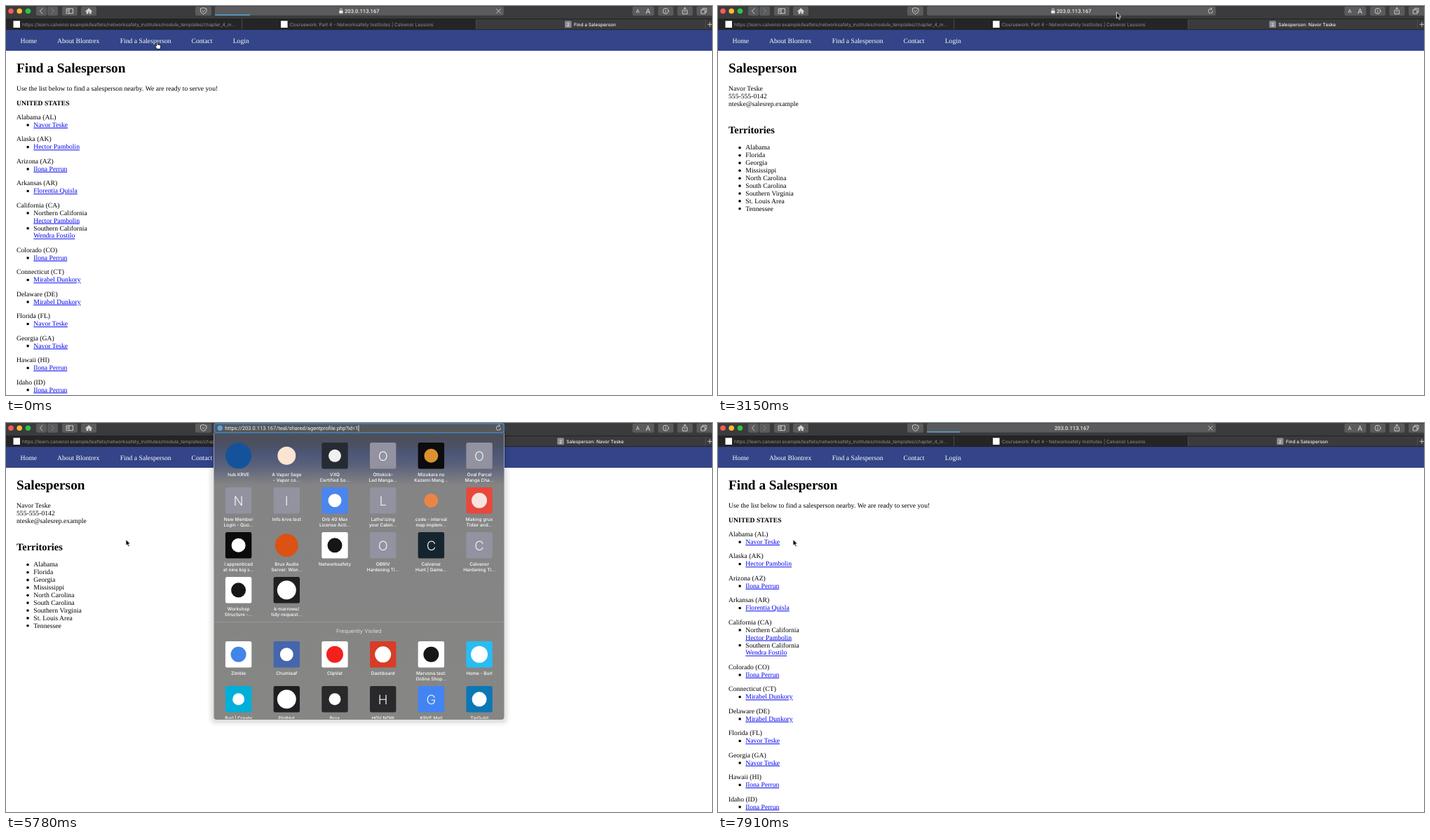
Animation of 1007 by 556 pixels, one loop 8000 ms. Source, as an HTML page:

```html
<!DOCTYPE html>
<html lang="en">
<head>
<meta charset="utf-8">
<title>Salesperson directory</title>
<style>
html, body { margin: 0; width: 100%; height: 100%; overflow: hidden; background: #fff; }
svg { display: block; width: 100%; height: 100%; text-rendering: geometricPrecision; }
.page { font: 9.67px "Liberation Serif", "Times New Roman", serif; }
.page .h1 { font-size: 19.3px; font-weight: 700; }
.page .h2 { font-size: 14.4px; font-weight: 700; }
.page .b { font-weight: 700; }
.page .link { fill: #00e; text-decoration: underline; }
.nav { fill: #fff; }
.tab { font: 6.6px Inter, Roboto, sans-serif; fill: #929294; }
.tab.on { font-weight: 500; fill: #f2f2f2; }
.url { font: 7.55px Roboto, Inter, sans-serif; fill: #f4f4f4; }
.addr { font: 500 7.6px Roboto, Inter, sans-serif; fill: #ececec; }
.label { font: 500 6.5px Inter, Roboto, sans-serif; fill: #fff; text-anchor: middle; }
.mono { font: 300 18.5px Inter, Roboto, sans-serif; fill: #f1f1f4; text-anchor: middle; }
.head { font: 7.6px Inter, Roboto, sans-serif; fill: #dededc; text-anchor: middle; }
.icon { fill: none; stroke: #d6d6d6; stroke-width: .9; stroke-linecap: round; stroke-linejoin: round; }
.button { fill: #5a5b5c; }

/* Every change is a hard cut, so all tracks hold their value until the next key. */
.t { animation: 8s step-end infinite; }
#list { animation-name: list; }
#seller { animation-name: seller; }
#listTab { animation-name: listTab; }
#sellerTab { animation-name: sellerTab; }
#stop { animation-name: stop; }
#reload { animation-name: reload; }
#bar { animation-name: bar; }
#share { animation-name: share; }
#lock { animation-name: lock; }
#idle { animation-name: idle; }
#ghost { animation-name: ghost; }
#focus { animation-name: focus; }
#typed { animation-name: typed; }
#select { animation-name: select; }
#caret { animation-name: caret; }
#panel { animation-name: panel; transform-origin: 503.5px 0; }
#cursor { animation-name: move; }
#arrow { animation-name: arrow; }
#hand { animation-name: hand; }
#beam { animation-name: beam; }

@keyframes list { 0% { opacity: 1 } 26% { opacity: 0 } 98.875%, 100% { opacity: 1 } }
@keyframes seller { 0% { opacity: 0 } 26% { opacity: 1 } 98.875%, 100% { opacity: 0 } }
@keyframes listTab { 0% { opacity: 1 } 29.75% { opacity: 0 } 98.875%, 100% { opacity: 1 } }
@keyframes sellerTab { 0% { opacity: 0 } 29.75% { opacity: 1 } 98.875%, 100% { opacity: 0 } }
@keyframes stop { 0%, 26%, 94.125%, 100% { opacity: 1 } 6.75%, 29.75% { opacity: 0 } }
@keyframes reload { 0%, 26%, 94.125%, 100% { opacity: 0 } 6.75%, 29.75% { opacity: 1 } }
@keyframes bar {
  0% { width: 50px } 3.375% { width: 87px } 6.75% { width: 0 }
  26% { width: 60px } 29.75% { width: 0 }
  94.125% { width: 14px } 98.875%, 100% { width: 47px }
}
@keyframes share { 0% { opacity: 1 } 26% { opacity: .35 } 29.75%, 100% { opacity: 1 } }
@keyframes lock { 0% { opacity: 1 } 94.125%, 100% { opacity: 0 } }
@keyframes idle {
  0% { opacity: 1; transform: none }
  44.625% { opacity: 0; transform: none }
  76.25% { opacity: 1; transform: translateX(-27px) }
  79.25% { opacity: 1; transform: translateX(-10px) }
  84.125% { opacity: 1; transform: none }
  94.125%, 100% { opacity: 1; transform: translateX(-3px) }
}
@keyframes ghost { 0%, 79.25%, 100% { opacity: 0 } 76.25% { opacity: 1 } }
@keyframes focus { 0%, 76.25%, 100% { opacity: 0 } 44.625% { opacity: 1 } }
@keyframes typed { 0% { transform: translateX(28px) } 48.75%, 100% { transform: none } }
@keyframes select { 0% { opacity: 1 } 53.625%, 100% { opacity: 0 } }
@keyframes caret { 0%, 59.875%, 100% { opacity: 0 } 53.625%, 69.25% { opacity: 1 } }
@keyframes panel {
  0%, 76.25%, 100% { opacity: 0; transform: none }
  44.625% { opacity: .64; transform: scale(.9915, .9925) }
  48.75% { opacity: 1; transform: none }
}
@keyframes move {
  0% { transform: translate(212px, 51px) }
  3.375% { transform: translate(178px, 213px) }
  6.75% { transform: translate(211px, 139px) }
  10.125% { transform: translate(146px, 175px) }
  13% { transform: translate(85px, 200px) }
  16% { transform: translate(65px, 173px) }
  18.5%, 21.125% { transform: translate(61px, 170px) }
  26% { transform: translate(322px, 130px) }
  29.75% { transform: translate(528px, 55px) }
  35.5% { transform: translate(572px, 19px) }
  39.375% { transform: translate(568px, 8.5px) }
  48.75% { transform: translate(549px, 4px) }
  69.25% { transform: translate(248px, 126px) }
  72.25% { transform: translate(170.5px, 166px) }
  76.25% { transform: translate(168px, 166px) }
  79.25% { transform: translate(171px, 93px) }
  84.125% { transform: translate(194px, 60px) }
  89.25% { transform: translate(219px, 49px) }
  94.125% { transform: translate(150px, 113px) }
  98.875%, 100% { transform: translate(106.5px, 166px) }
}
@keyframes arrow {
  0%, 13%, 21.125%, 48.75%, 84.125% { opacity: 0 }
  3.375%, 16%, 26%, 69.25%, 94.125%, 100% { opacity: 1 }
}
@keyframes hand {
  0%, 13%, 21.125%, 84.125% { opacity: 1 }
  3.375%, 16%, 26%, 94.125%, 100% { opacity: 0 }
}
@keyframes beam { 0%, 69.25%, 100% { opacity: 0 } 48.75% { opacity: 1 } }
</style>
</head>
<body>
<svg viewBox="0 0 1007 556" preserveAspectRatio="none">
  <defs>
    <linearGradient id="glass" gradientUnits="userSpaceOnUse" x1="0" y1="14" x2="0" y2="427">
      <stop offset="0" stop-color="#4d4f57"/>
      <stop offset=".04" stop-color="#4b5062"/>
      <stop offset=".07" stop-color="#4d5674"/>
      <stop offset=".11" stop-color="#58607a"/>
      <stop offset=".18" stop-color="#848485"/>
      <stop offset="1" stop-color="#868684"/>
    </linearGradient>
    <filter id="blur" x="-5%" y="-5%" width="110%" height="110%"><feGaussianBlur stdDeviation="3"/></filter>
    <clipPath id="inside"><path d="M296 14H711V423H296Z"/></clipPath>
  </defs>

  <!-- page -->
  <path fill="#fff" d="M0 0H1007V556H0Z"/>
  <path fill="#334488" d="M0 33H1007V64H0Z"/>
  <g class="page">
    <g class="nav">
      <text x="20.5" y="52.6">Home</text>
      <text x="73" y="52.6">About Blontrex</text>
      <text x="162.7" y="52.6">Find a Salesperson</text>
      <text x="264.5" y="52.6">Contact</text>
      <text x="323.7" y="52.6">Login</text>
    </g>
    <g id="list" class="t">
      <text class="h1" x="15" y="94.5">Find a Salesperson</text>
      <text x="15" y="121">Use the list below to find a salesperson nearby. We are ready to serve you!</text>
      <text class="b" x="15" y="141.5">UNITED STATES</text>
    </g>
    <g id="seller" class="t">
      <text class="h1" x="15" y="94.5">Salesperson</text>
      <text x="15" y="121">Navor Teske</text>
      <text x="15" y="131.9">555-555-0142</text>
      <text x="15" y="142.8">nteske@salesrep.example</text>
      <text class="h2" x="15" y="181.5">Territories</text>
    </g>
  </g>

  <!-- toolbar -->
  <path fill="#3b3b3d" d="M0 0H1007V34H0Z"/>
  <path fill="#252526" d="M0 18.5H670V33.5H0Z"/>
  <path stroke="#4b4b4d" d="M336.5 18.5V33.5M670.5 18.5V33.5M997.5 18.5V33.5"/>
  <path stroke="#1d1d1e" stroke-width=".8" d="M0 18.5H1007M0 33.6H1007"/>
  <circle cx="7" cy="7.2" r="3.8" fill="#fc5b57"/>
  <circle cx="19.2" cy="7.2" r="3.8" fill="#fdbc2e"/>
  <circle cx="31.5" cy="7.2" r="3.8" fill="#2ac840"/>
  <g id="buttons" class="button"></g>
  <g class="icon">
    <path d="M52 3.5 48.5 7.2 52 11"/>
    <path stroke="#858587" d="M64.8 3.5 68.3 7.2 64.8 11"/>
    <path d="M86.5 3.8H95.5V10.7H86.5ZM90 3.8V10.7M87.7 5.8H88.8M87.7 7.5H88.8"/>
    <path fill="#d6d6d6" stroke-width=".5" d="M113.6 7.4 118.2 3.2 122.8 7.4H121.5V11H119.2V8.2H117.2V11H114.9V7.4Z"/>
    <path d="M281.7 2.6 286 4V7.2Q285.6 10 281.7 11.6 277.8 10 277.4 7.2V4ZM280 6.4 281.7 8 283.4 6.4"/>
    <circle cx="941" cy="7.2" r="4"/>
    <path d="M941 6.8V9.3M941 5V5.1"/>
    <g id="share" class="t"><path d="M966.3 6H965V11.3H971.6V6H970.3M968.3 8.5V2.3M966.5 4 968.3 2.3 970.1 4"/></g>
    <path d="M991.8 5.3H997V11H991.8ZM993.7 5.3V3.3H999V9H997"/>
  </g>
  <g fill="#dedede" font-family="Inter, Roboto, sans-serif">
    <text x="898.6" y="10" font-size="7.5">A</text>
    <text x="912.2" y="10.6" font-size="10">A</text>
  </g>

  <!-- tabs -->
  <path fill="#fff" d="M10.5 21.3H20V31H10.5ZM392 21.3H401.6V31H392Z"/>
  <text class="tab" x="23" y="28.5">https://learn.calvenor.example/leaflets/networksafety_institutes/module_templates/chapter_4_in...</text>
  <text class="tab" x="405" y="28.5">Coursework: Part 4 - Networksafety Institutes | Calvenor Lessons</text>
  <g id="listTab" class="t">
    <rect x="797" y="21.3" width="9.6" height="9.6" rx="1.5" fill="#8b8b95"/>
    <text class="tab on" x="799.8" y="28.5">2</text>
    <text class="tab on" x="810" y="28.5">Find a Salesperson</text>
  </g>
  <g id="sellerTab" class="t">
    <rect x="786.3" y="21.3" width="9.6" height="9.6" rx="1.5" fill="#8b8b95"/>
    <text class="tab on" x="789.1" y="28.5">2</text>
    <text class="tab on" x="799.2" y="28.5">Salesperson: Navor Teske</text>
  </g>
  <path class="icon" d="M1001 26.3H1007M1004 23.3V29.3"/>

  <!-- suggestion panel -->
  <g id="panel" class="t">
    <rect x="292" y="14" width="423" height="415" rx="6" fill="#000" opacity=".13" filter="url(#blur)"/>
    <path fill="#e2e2e2" d="M296 14H711V422Q711 428 705 428H302Q296 428 296 422Z"/>
    <path fill="url(#glass)" d="M296.5 14H710.5V420Q710.5 424 706.5 424H300.5Q296.5 424 296.5 420Z"/>
    <path stroke="#9d9d9b" stroke-width=".8" d="M297 284.5H710.5"/>
    <text class="head" x="503.3" y="300.2">Frequently Visited</text>
    <g id="tiles" clip-path="url(#inside)"></g>
  </g>

  <!-- address field -->
  <rect x="298" y=".5" width="412" height="13" rx="2.5" class="button"/>
  <rect id="bar" class="t" x="298" y="12" width="0" height="1.5" fill="#55a9dc"/>
  <g id="idle" class="t">
    <g id="lock" class="t">
      <rect x="475.3" y="6.4" width="5.2" height="4.2" rx=".6" fill="#ececec"/>
      <path class="icon" d="M476.4 6.4V5.1A1.5 1.5 0 0 1 479.4 5.1V6.4"/>
    </g>
    <text class="addr" x="483" y="10.3">203.0.113.167</text>
  </g>
  <g id="ghost" class="t" opacity="0">
    <g class="url" style="fill:#858688">
      <text x="431" y="10.3">https</text>
      <text x="505.5" y="10.3">/teal/shared/agentprofile.php?id=1</text>
    </g>
  </g>
  <g id="focus" class="t">
    <rect x="297.2" y=".8" width="413" height="13" rx="3" fill="#56585b" stroke="#437fb5" stroke-width="1.8"/>
    <circle cx="305.3" cy="7.2" r="3.7" fill="#58a4df"/>
    <g id="typed" class="t">
      <path id="select" class="t" fill="#3d6b98" d="M312 2.5H503.5V12.5H312Z"/>
      <text class="url" x="312.3" y="10.2">https://203.0.113.167/teal/shared/agentprofile.php?id=1</text>
    </g>
    <path id="caret" class="t" fill="#fff" d="M502.6 3H503.4V12H502.6Z"/>
  </g>
  <path id="stop" class="icon t" d="M699.5 4.3 705.5 10.3M705.5 4.3 699.5 10.3"/>
  <path id="reload" class="icon t" d="M705.7 7.2A3.2 3.2 0 1 1 702.5 4H704M702.8 2.3 704.6 4 702.8 5.8"/>

  <!-- pointer -->
  <g id="cursor" class="t" stroke-linejoin="round">
    <path id="arrow" class="t" fill="#000" stroke="#fff" stroke-width=".8" d="M.5 .4V9.2L2.5 7.4 4 10.7 5.6 10 4.2 6.8H6.9Z"/>
    <path id="hand" class="t" fill="#fff" stroke="#000" stroke-width=".8" d="M2.6 6.3V1.4Q3.4 0 4.2 1.4V4.3Q5 3.7 5.7 4.5 6.5 4 7.2 4.8 8.4 4.4 8.7 5.6V8L7.8 10.5H3.6L.8 7Q.6 5.6 1.6 5.7Z"/>
    <path id="beam" class="t" fill="none" stroke="#e8e8e8" stroke-width=".9" d="M.6 .6Q2.5 .6 2.5 2V8Q2.5 9.6 .6 9.6M4.4 .6Q2.5 .6 2.5 2V8Q2.5 9.6 4.4 9.6M1.4 6.5H3.6"/>
  </g>
</svg>
<script>
const add = (id, markup) => { document.getElementById(id).innerHTML += markup; };
const text = (x, y, s, cls = '') => `<text class="${cls}" x="${x}" y="${y}">${s}</text>`;

add('buttons', [[43, 15], [59, 15], [80, 22], [107, 22], [270, 23], [893.5, 31], [930, 22], [957.5, 22], [985, 24]]
  .map(([x, w]) => `<rect x="${x}" y=".7" width="${w}" height="13" rx="2.2"/>`).join(''));

// Directory: each state has links; "Area: Name" entries take two lines.
const LINE = 10.9, GAP = 9.65;
const [navor, hector, ilona, mirabel] = ['Navor Teske', 'Hector Pambolin', 'Ilona Perrun', 'Mirabel Dunkory'];
const states = [
  ['Alabama (AL)', navor], ['Alaska (AK)', hector], ['Arizona (AZ)', ilona],
  ['Arkansas (AR)', 'Florentia Quisla'],
  ['California (CA)', 'Northern California:' + hector, 'Southern California:Wendra Fostilo'],
  ['Colorado (CO)', ilona], ['Connecticut (CT)', mirabel], ['Delaware (DE)', mirabel],
  ['Florida (FL)', navor], ['Georgia (GA)', navor], ['Hawaii (HI)', ilona], ['Idaho (ID)', ilona]
];
let y = 162, rows = '';
for (const [state, ...people] of states) {
  rows += text(15, y, state);
  for (const entry of people) {
    const parts = entry.split(':');
    rows += `<rect x="29.6" y="${y + LINE - 4.3}" width="3.1" height="3.1"/>`;
    parts.forEach((s, i) => {
      y += LINE;
      rows += text(39.3, y, s, i === parts.length - 1 ? 'link' : '');
    });
  }
  y += LINE + GAP;
}
add('list', rows);

const areas = ['Alabama', 'Florida', 'Georgia', 'Mississippi', 'North Carolina', 'South Carolina',
  'Southern Virginia', 'St. Louis Area', 'Tennessee'];
add('seller', areas.map((s, i) => {
  const base = 205.4 + i * LINE;
  return `<circle cx="31" cy="${base - 2.8}" r="1.8"/>` + text(39.3, base, s);
}).join(''));

// Tiles: label, tile colour, then a letter or a plain dot (colour, radius).
const GREY = '#9292a0', DARK = '#29292c', WHITE = '#fff';
const saved = [
  ['hub.KRVE', '', '#14539a', 18.5], ['A Vapor Sage|- Vapor co...', '', '#fbe4d2', 13],
  ['VXQ|Certified So...', '#262b33', '#f0f0f0', 9], ['Ottokick-|Lad Manga...', GREY, 'O'],
  ['Mizukara no|Kazemi Mang...', '#0c0b0d', '#d9922f', 10], ['Oval Parcel|Manga Cha...', GREY, 'O'],
  ['New Member|Login - Quo...', GREY, 'N'], ['Info.krve.test', GREY, 'I'],
  ['Orb 40 Max|License Acti...', '#4a86ee', WHITE, 9.5], ["Lathe'izing|your Cabin...", GREY, 'L'],
  ['code - interval|map implem...', '', '#e98645', 10], ['Making grux|Tidier and...', '#e8483b', '#f8e4df', 11],
  ['I apprenticed|at nine big s...', '#0b0b0b', WHITE, 10], ['Brux Audio|Server: Won...', '', '#db5212', 16.5],
  ['Networksafety', WHITE, '#161616', 10.5], ['OBRIV|Hardening Ti...', GREY, 'O'],
  ['Calvenor|Hunt | Game...'.replace(' | ', ' &#124; '), '#15252e', 'C'], ['Calvenor|Hardening Ti...', GREY, 'C'],
  ['Workshop|Structure -...', WHITE, '#161616', 10.5], ['k-marrowe/|tidy-request...', '#1f1f22', WHITE, 13.5]
];
const visited = [
  ['Zimble', WHITE, '#4285e8', 11], ['Chumleaf', '#4566ad', WHITE, 9.5], ['ClipVat', WHITE, '#f3211d', 12],
  ['Dashboard', '#d73d28', WHITE, 11.5], ['Marvona.test:|Online Shop...', WHITE, '#161616', 11],
  ['Home - Burl', '#27bdf3', WHITE, 12], ['Burl &#124; Create', '#00afd8', WHITE, 8.5],
  ['PlotHut', '#1f1f22', WHITE, 13.5], ['Brux', DARK, WHITE, 8.5], ['HQV NOW', DARK, 'H'],
  ['KRVE Mail', '#4384f4', 'G'], ['TieGuild', '#0b77b5', WHITE, 10.5]
];
const tile = top => ([label, back, mark, r], i) => {
  const x = 331.6 + i % 6 * 68.7, cy = top + Math.floor(i / 6) * 64;
  const box = back && `<rect x="${x - 18.7}" y="${cy - 18.7}" width="37.4" height="37.4" rx="2.5" fill="${back}"/>`;
  const sign = r ? `<circle cx="${x}" cy="${cy}" r="${r}" fill="${mark}"/>` : text(x, cy + 6.8, mark, 'mono');
  return box + sign + label.split('|').map((s, k) => text(x, cy + 29.2 + k * 8.3, s, 'label')).join('');
};
add('tiles', saved.map(tile(46.8)).join('') + visited.map(tile(330.8)).join(''));
</script>
</body>
</html>
```
